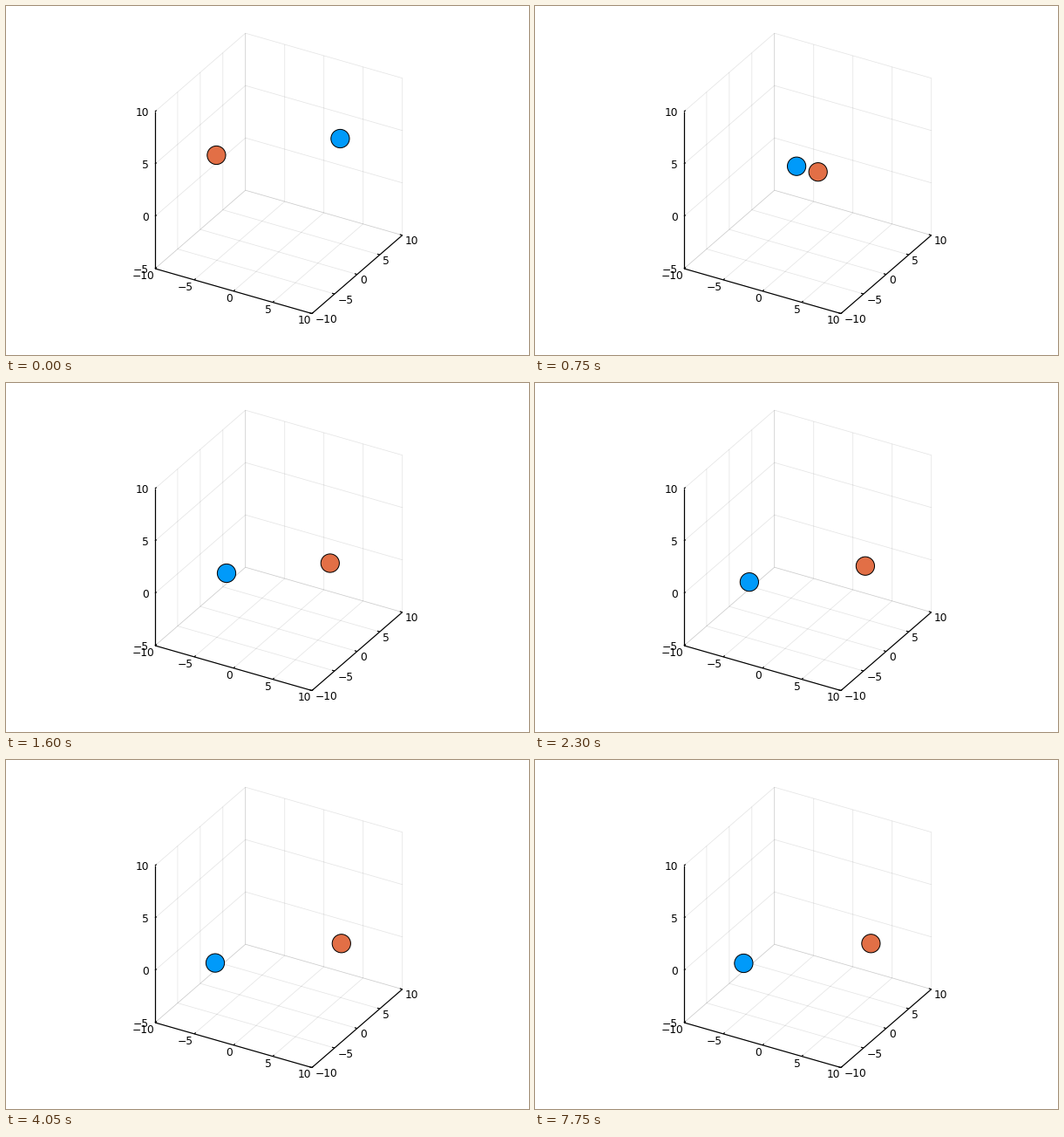
A matplotlib script for the animation above (8000 ms loop, 600 px wide and 400 px high).

```python
import numpy as np
import matplotlib.pyplot as plt
from matplotlib.animation import FuncAnimation
from matplotlib.patches import Circle

W, H, DPI = 600, 400, 100
STEP, FRAMES = 50, 160
PX = 72 / DPI  # points per pixel

plt.rcParams["font.family"] = "DejaVu Sans"
fig = plt.figure(figsize=(W / DPI, H / DPI), dpi=DPI, facecolor="white")
ax = fig.add_axes([0, 0, 1, 1])
ax.set_xlim(0, W)
ax.set_ylim(H, 0)
ax.axis("off")


def project(x, y, z):
    """Orthographic view of the box [-10,10] x [-10,10] x [-5,10]."""
    u, v, w = (x + 10) / 20, (y + 10) / 20, (z + 5) / 15
    return 171 + 180 * u + 103.7 * v, 301 + 51.5 * u - 89.8 * v - 180 * w


def line(*pts, color="black", width=1.2, alpha=1.0):
    xs, ys = zip(*(project(*p) for p in pts))
    ax.plot(xs, ys, color=color, lw=width * PX, alpha=alpha,
            solid_capstyle="butt", solid_joinstyle="round")


def grid(*pts):
    line(*pts, width=0.8, alpha=0.1)


def label(value, x, y, ha):
    ax.text(x, y + 4.5, str(value).replace("-", "\u2212"),
            ha=ha, va="baseline", fontsize=12.3 * PX)


TICK = 0.32
for t in (-10, -5, 0, 5, 10):
    grid((t, -10, -5), (t, 10, -5), (t, 10, 10))
    grid((10, t, -5), (-10, t, -5), (-10, t, 10))
    line((t, -10, -5), (t, -10 + TICK, -5))
    line((10, t, -5), (10 - TICK, t, -5))
    px, py = project(t, -10, -5)
    label(t, px - 1, py + 7.5, "right")
    px, py = project(10, t, -5)
    label(t, px + 3.3, py + 6, "left")

for t in (-5, 0, 5, 10):
    grid((-10, -10, t), (-10, 10, t), (10, 10, t))
    line((-10, -10, t), (-10, -10 + TICK, t))
    px, py = project(-10, -10, t)
    label(t, px - 7, py, "right")

line((-10, -10, 10), (-10, -10, -5))
line((-10, -10, -5), (10, -10, -5))
line((10, -10, -5), (10, 10, -5))

# time (s), distance left to run in x, height of blue, height of orange
KEYS = np.array([
    (0.00, 144.0, 152.0, 171.0),
    (0.20, 130.0, 156.0, 174.0),
    (0.40, 102.5, 165.0, 179.8),
    (0.75, 60.7, 183.7, 190.2),
    (0.85, 50.0, 188.6, 192.9),
    (1.20, 26.0, 204.8, 200.6),
    (1.60, 13.6, 218.0, 206.5),
    (1.70, 12.0, 220.5, 207.4),
    (2.55, 5.2, 229.8, 210.1),
    (3.10, 3.8, 231.6, 210.3),
    (3.40, 2.2, 232.2, 210.3),
    (4.05, 0.6, 232.6, 210.3),
    (5.00, 0.2, 232.8, 210.3),
    (8.00, 0.0, 233.0, 210.3),
])


def slopes(t, y):
    """Monotone cubic tangents, at rest at both ends."""
    h, d = np.diff(t), np.diff(y) / np.diff(t)
    m = np.zeros_like(y)
    for i in range(1, len(y) - 1):
        a, b = d[i - 1], d[i]
        if a * b > 0:
            p, q = 2 * h[i] + h[i - 1], h[i] + 2 * h[i - 1]
            m[i] = (p + q) / (p / a + q / b)
    return m


TIMES = KEYS[:, 0]
VALUES = KEYS[:, 1:]
TANGENTS = np.column_stack([slopes(TIMES, col) for col in VALUES.T])


def state(t):
    i = int(np.clip(np.searchsorted(TIMES, t, "right") - 1, 0, len(TIMES) - 2))
    h = TIMES[i + 1] - TIMES[i]
    s = (t - TIMES[i]) / h
    return ((1 + 2 * s) * (1 - s) ** 2 * VALUES[i]
            + s * (1 - s) ** 2 * h * TANGENTS[i]
            + s * s * (3 - 2 * s) * VALUES[i + 1]
            - s * s * (1 - s) * h * TANGENTS[i + 1])


def ball(color, z):
    return ax.add_patch(Circle((0, 0), 10.6, fc=color, ec="black",
                               lw=1.0 * PX, zorder=z))


blue, orange = ball("#009AFA", 5), ball("#E26F46", 6)


def update(k):
    gap, y_blue, y_orange = state(k * STEP / 1000)
    blue.center = 239.4 + gap, y_blue
    orange.center = 385.4 - gap, y_orange
    return blue, orange


anim = FuncAnimation(fig, update, frames=FRAMES, interval=STEP,
                     repeat=True, repeat_delay=0)
plt.show()
```
